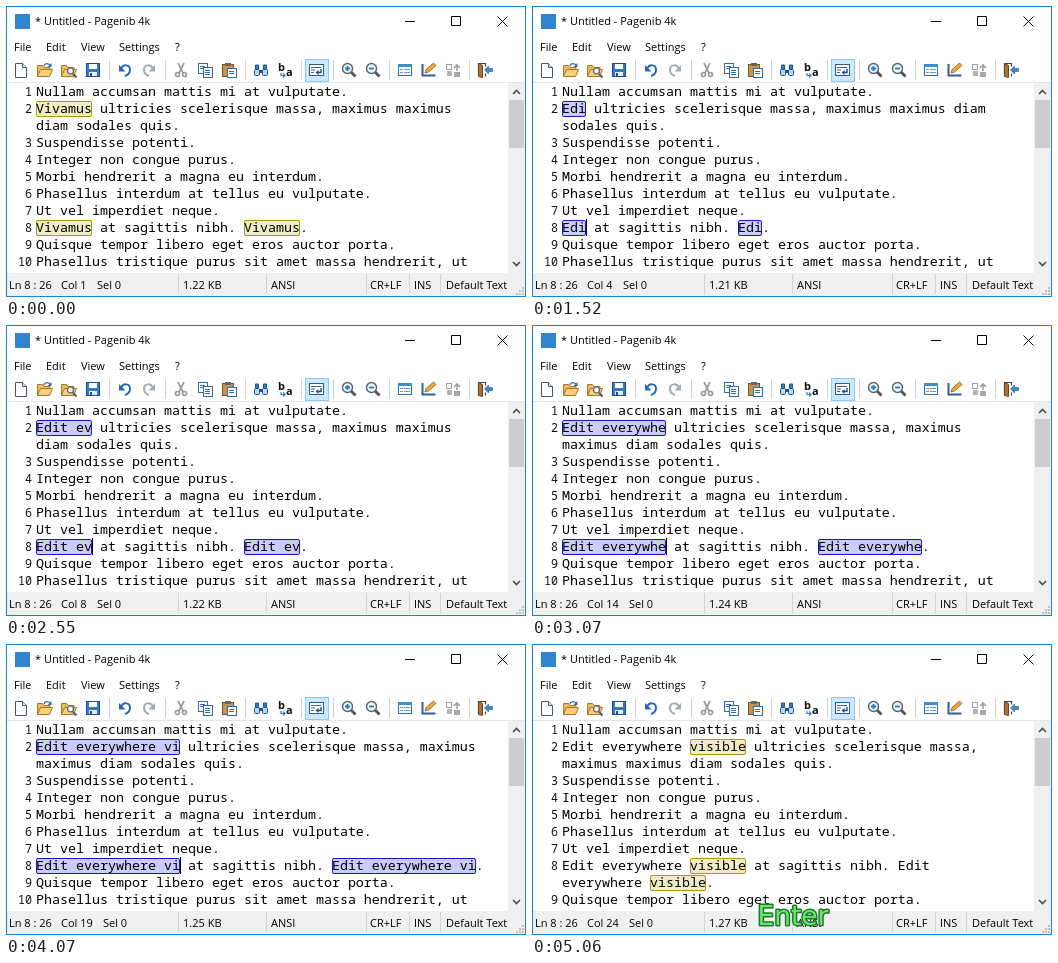
These frames come from a looping animation (520x291 px, 8 s). An HTML page:

```html
<!DOCTYPE html>
<html lang="en">
<head>
<meta charset="utf-8">
<title>Multi-edit demo</title>
<style>
  html, body { margin: 0; width: 100%; height: 100%; overflow: hidden; background: #fff; }
  svg { display: block; width: 100vw; height: 100vh; }
  text { white-space: pre; }
  .ui { font: 11px "Open Sans", "Noto Sans", sans-serif; fill: #000; }
  .bold { font: 700 11px "Open Sans", "Noto Sans", sans-serif; fill: #111; }
  .code { font: 13.3333px "Noto Sans Mono", "DejaVu Sans Mono", monospace; fill: #000; }
  .num { font: 11.7px "Noto Sans Mono", "DejaVu Sans Mono", monospace; fill: #111; text-anchor: end; }
  .note { font: 26.4px "DejaVu Sans", sans-serif; text-anchor: middle; fill: #6be572;
    stroke: #1f7a2a; stroke-width: 3px; stroke-linejoin: round; paint-order: stroke; }
</style>
</head>
<body>
<svg id="stage" viewBox="0 0 520 291" preserveAspectRatio="none">
  <rect width="520" height="291" fill="#fff"/>
  <g id="chrome"></g>
  <g id="tools"></g>
  <g id="page"></g>
  <g id="status"></g>
  <text id="note" class="note" x="261" y="280.5"></text>
  <rect x=".5" y=".5" width="519" height="290" fill="none" stroke="#1883d7"/>
</svg>
<script>
const LOOP = 8000, COLS = 56, ROWS = 11, LEFT = 30, CELL = 8, PITCH = 17;
const $ = id => document.getElementById(id);
const rect = (x, y, w, h, fill, more = '') =>
  `<rect x="${x}" y="${y}" width="${w}" height="${h}" fill="${fill}" ${more}/>`;
const path = (d, stroke, width = 1, fill = 'none') =>
  `<path d="${d}" stroke="${stroke}" stroke-width="${width}" fill="${fill}"/>`;
const circle = (x, y, r, stroke, width = 1, fill = 'none') =>
  `<circle cx="${x}" cy="${y}" r="${r}" stroke="${stroke}" stroke-width="${width}" fill="${fill}"/>`;
const label = (x, y, s, cls = 'ui') => `<text x="${x}" y="${y}" class="${cls}">${s}</text>`;

const lines = word => [
  'Nullam accumsan mattis mi at vulputate.',
  word + ' ultricies scelerisque massa, maximus maximus diam sodales quis.',
  'Suspendisse potenti.',
  'Integer non congue purus.',
  'Morbi hendrerit a magna eu interdum.',
  'Phasellus interdum at tellus eu vulputate.',
  'Ut vel imperdiet neque.',
  word + ' at sagittis nibh. ' + word + '.',
  'Quisque tempor libero eget eros auctor porta.',
  'Phasellus tristique purus sit amet massa hendrerit, ut'
];
const ACTIVE = 7;

const phrase = 'Edit everywhere visible';
const typed = (t, n, more) =>
  ({ t, word: phrase.slice(0, n), col: n + 1, sel: 0, look: 'edit', caret: true, ...more });
const idle = { word: 'Vivamus', col: 1, sel: 0, look: 'match' };
const steps = [
  { ...idle, t: 0 },
  { ...idle, t: 530, note: 'Ctrl+Tab' },
  { ...idle, t: 1020, col: 8, sel: 7, look: 'edit', note: 'Ctrl+Tab' },
  typed(1520, 3), typed(2020, 5), typed(2550, 7), typed(3070, 13), typed(3620, 16), typed(4070, 18),
  typed(4560, 23, { note: 'Enter' }),
  typed(5060, 23, { note: 'Enter', look: 'match', mark: 'visible', caret: false })
];
const looks = {
  match: ['#f0ecc6', '#aa9614'],
  edit: ['#ccccfb', '#1414d2'],
  chosen: ['#7c88bd', '#1414b4']
};

// Split a line into rows of at most COLS characters, ignoring trailing blanks.
function wrap(line) {
  const rows = [];
  let row = '', from = 0;
  for (const word of line.match(/\S+\s*/g)) {
    if (row && (row + word).trimEnd().length > COLS) {
      rows.push({ row, from });
      from += row.length;
      row = '';
    }
    row += word;
  }
  rows.push({ row, from });
  return rows;
}

function hits(line, mark) {
  const found = [];
  for (let i = line.indexOf(mark); i >= 0; i = line.indexOf(mark, i + mark.length)) found.push(i);
  return found;
}

function drawPage(s) {
  const mark = s.mark || s.word;
  let out = '', r = 0;
  lines(s.word).forEach((line, n) => {
    const found = hits(line, mark);
    wrap(line).forEach(({ row, from }, part) => {
      if (r >= ROWS) return;
      const y = 90 + r++ * PITCH;
      if (!part) out += label(26, y, n + 1, 'num');
      found.forEach((at, k) => {
        const a = Math.max(at, from) - from;
        const b = Math.min(at + mark.length, from + row.length) - from;
        if (b <= a) return;
        const [fill, edge] = looks[s.sel && n === ACTIVE && !k ? 'chosen' : s.look];
        out += rect(LEFT + a * CELL + .5, y - 11.5, (b - a) * CELL - 1, 15, fill, `stroke="${edge}" rx="1.5"`);
      });
      out += label(LEFT, y, row, 'code');
      if (s.caret && n === ACTIVE && !part) out += rect(LEFT + (s.col - 1) * CELL, y - 13, 1, PITCH, '#000');
    });
  });
  return out;
}

function drawStatus(s) {
  const size = (1.22 + (s.word.length - 7) * 3 / 1024).toFixed(2);
  let out = rect(1, 267, 518, 23, '#f0f0f0');
  for (const x of [172, 260, 360, 403, 434]) out += rect(x, 268, 1, 20, '#d4d4d4');
  const cells = [[3, 'Ln 8 : 26'], [55, 'Col ' + s.col], [s.col > 9 ? 97 : 91, 'Sel ' + s.sel],
    [177, size + ' KB'], [265, 'ANSI'], [364, 'CR+LF'], [408, 'INS'], [440, 'Default Text']];
  for (const [x, str] of cells) out += label(x, 283, str);
  for (let i = 0; i < 3; i++)
    for (let j = 0; j <= i; j++) out += rect(516 - j * 3, 281 + i * 3, 2, 2, '#bfbfbf');
  return out;
}

function drawChrome() {
  let out = rect(9, 8, 15, 15, '#2f86cf') + label(29, 19, '* Untitled - Pagenib 4k');
  out += path('M399 15.5h10', '#000') + path('M445.5 10.5h9v9h-9z', '#000') + path('M491.5 10.5l10 10m0-10l-10 10', '#000');
  [[8, 'File'], [40, 'Edit'], [75, 'View'], [113, 'Settings'], [169, '?']]
    .forEach(([x, s]) => out += label(x, 45, s));
  for (const x of [103, 159, 239, 295, 327, 383, 463]) out += rect(x, 54, 1, 20, '#d0d0d0');
  out += rect(1, 76, 518, 1, '#e6e6e6');
  out += rect(502, 77, 17, 190, '#f0f0f0') + rect(503, 94, 15, 48, '#cdcdcd');
  return out + path('M507 88l3.5-3.5l3.5 3.5', '#505050', 1.6) + path('M507 256l3.5 3.5l3.5-3.5', '#505050', 1.6);
}

// Toolbar icons, each in a 16 x 16 box.
const sheet = (x, y, w, h, edge) => rect(x + .5, y + .5, w, h, '#fff', `stroke="${edge}"`);
const folder = path('M.5 14.5v-11h5l1.5 2h6v3', '#a87828', 1, '#e9bd62') +
  path('M.5 14.5l3-7h12l-3 7z', '#a87828', 1, '#f7cf78');
const floppy = rect(1.5, 1.5, 13, 13, '#3478c0', 'stroke="#1b4f8c"') +
  rect(4, 2, 8, 5, '#fff') + rect(4, 10, 8, 4, '#e8edf2') + rect(5, 11, 2, 3, '#1b4f8c');
const turn = c => path('M4 7c2-5 9-5 9 1c0 3-2 5-5 6', c, 2) + path('M2 3v6.5h6.5z', 'none', 0, c);
const lens = sign => path('M10 10l4.5 4.5', '#4f565c', 2.8) +
  circle(6.5, 6.5, 5, '#56636e', 1.4, '#eef6fb') + path(sign, '#2478cc', 1.8);
const dash = 'M4 6.5h5';
const barrel = x => rect(x + .5, 7.5, 5, 6, '#b9d7f1', 'stroke="#1f5290" rx="1"') +
  path(`M${x + 1.5} 7v-4h3v4`, '#1f5290', 1, '#3c7cc0');

function icons(live) {
  const ring = live ? '#285f9e' : '#92989d', blade = live ? '#4e5a66' : '#9a9ea2', ink = '#2f6cab';
  return [
    [15, path('M2.5 1.5h7l4 4v10h-11z', '#44586c', 1, '#fff') + path('M9.5 1.5v4h4', '#44586c', 1, '#dbe6f0')],
    [39, folder + path('M7 4c1-3 4-3 6-1', '#2c6fb3', 1.3) + path('M14.500 1v4h-4z', 'none', 0, '#2c6fb3')],
    [63, folder + path('M12 12l3.5 3.5', '#4f565c', 2) + circle(9.5, 9, 3, '#56636e', 1.2, '#eef6fb')],
    [87, floppy],
    [119, turn('#2667b5')],
    [143, `<g transform="matrix(-1 0 0 1 16 0)">${turn('#a3abb2')}</g>`],
    [175, path('M5 1l5 10M11 1l-5 10', blade, 1.7) + circle(4.5, 12.5, 2, ring, 1.6) + circle(11.5, 12.5, 2, ring, 1.6)],
    [199, sheet(1, 1, 9, 10, ink) + path('M3 4.5h5m-5 2h3', ink) +
      sheet(6, 5, 9, 10, ink) + path('M8 8.5h5m-5 2h5m-5 2h5', ink)],
    [223, rect(1.5, 2.5, 11, 12, '#c99649', 'stroke="#765322"') + rect(4, 1, 6, 3, '#666') +
      sheet(6, 6, 9, 9, ink) + path('M8 9.5h5m-5 2h5', ink)],
    [255, rect(6, 8, 4, 3, '#1f5290') + barrel(1) + barrel(9)],
    [279, label(1, 9, 'b', 'bold') + label(9, 14, 'a', 'bold') + path('M4 11v2.5h4m-2-2l2 2l-2 2', '#2c7fc9', 1.2)],
    [311, rect(-3.5, -2.5, 23, 22, '#cce8ff', 'stroke="#8ec8f5"') + sheet(0, 2, 14, 11, '#305c8c') +
      path('M2 5.500h10M2 8h4M2 10.500h3', '#46637f') + path('M12 7v3.500h-3', '#174f99', 1.4) + path('M9.500 8v5l-3-2.500z', 'none', 0, '#174f99')],
    [343, lens(dash + 'M6.5 4v5')],
    [367, lens(dash)],
    [399, sheet(1, 2, 13, 11, ink) + rect(1, 2, 14, 3, '#3f8ed3') + path('M3 7.5h3m1 0h6M3 10.5h3m1 0h6', '#6f97ba')],
    [423, path('M1.500 2v11.500h13', '#2b5f9e', 2) + path('M4 11l1-3.5l7.500-6.500l2.500 2.500l-7.500 6.500z', '#8a5c16', .8, '#eda93a')],
    [447, sheet(1, 2, 5, 5, '#a0a0a0') + rect(2, 9, 5, 5, '#b4b4b4') + rect(9, 10, 6, 5, '#a8a8a8') +
      path('M12 9v-6m-3 3l3-3l3 3', '#a0a0a0', 1.6)],
    [479, path('M1.5 14.5v-13h7v3m0 7v3z', '#4b4138', 1.2, '#fff') + path('M1.5 1.5l4 2v12l-4-1z', '#6b4420', 1, '#a8733c') +
      path('M7.5 8l4-4v2.500h4v3h-4v2.500z', '#225c99', .6, '#3f86cc')]
  ].map(([x, art]) => `<g transform="translate(${x - 8} 56)">${art}</g>`).join('');
}

let shown = -1;
function update(ms) {
  let i = steps.length - 1;
  while (steps[i].t > ms) i--;
  if (i === shown) return;
  shown = i;
  const s = steps[i];
  $('tools').innerHTML = icons(s.sel > 0);
  $('page').innerHTML = drawPage(s);
  $('status').innerHTML = drawStatus(s);
  $('note').textContent = s.note || '';
}

$('chrome').innerHTML = drawChrome();
const start = performance.now();
function tick() {
  update((performance.now() - start) % LOOP);
  requestAnimationFrame(tick);
}
tick();
</script>
</body>
</html>
```
